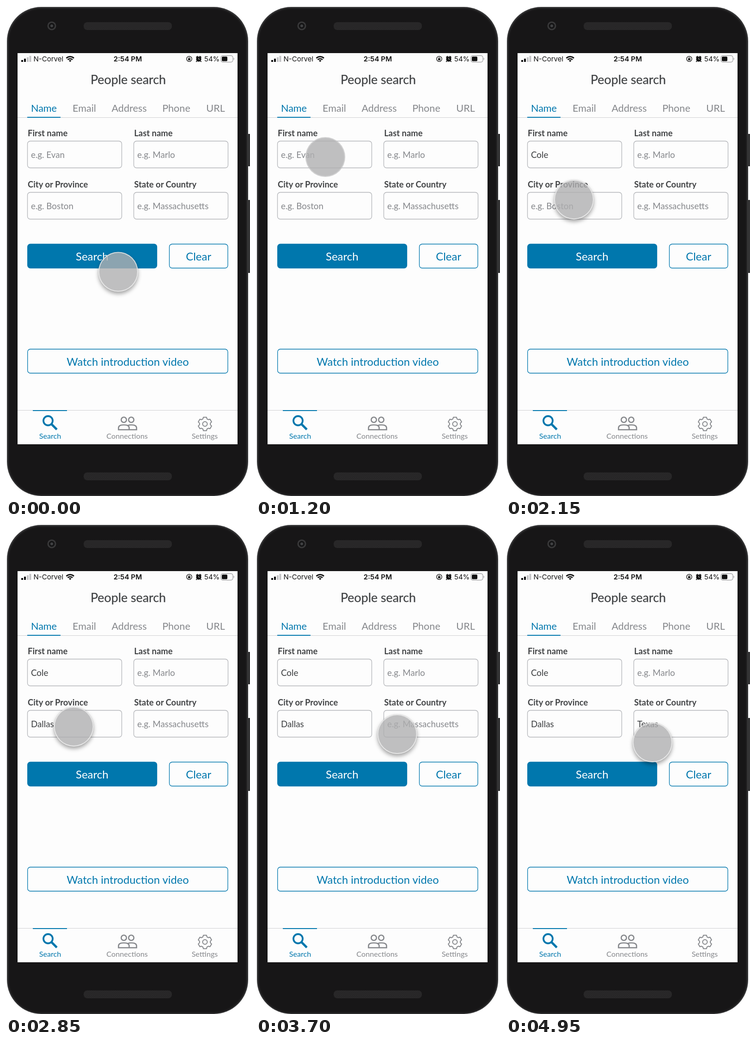
Animation, 528 px wide and 1061 px high, one loop 5 s. Source, as an HTML page:

```html
<!DOCTYPE html>
<html lang="en">
<head>
<meta charset="utf-8">
<title>People search</title>
<style>
html, body { margin: 0; width: 528px; height: 1061px; overflow: hidden; background: #fff; }
svg { display: block; }
text { font-family: Lato, Carlito, sans-serif; fill: #86888c; }
.status text { font: 15px Inter, Roboto, sans-serif; fill: #111; }
.title { font-size: 26.8px; fill: #414345; stroke: #414345; stroke-width: .25; }
.tabs { font-size: 21.6px; }
.labels text { font-size: 18.4px; font-weight: 700; fill: #414345; }
.fields rect { fill: #fdfdfd; stroke: #b3b5b9; stroke-width: 1.3; }
.fields text { font-size: 18.8px; }
.fields .typed { fill: #3c3e40; }
.buttons text { font-size: 24px; text-anchor: middle; }
.buttons rect { fill: #fdfdfd; stroke: #0077ad; stroke-width: 1.3; }
.nav text { font-size: 16.2px; text-anchor: middle; }
.mid { text-anchor: middle; }
.blue, .buttons .blue, .nav .blue { fill: #0077ad; }
.line { fill: none; stroke: #86888c; stroke-width: 2.6; }
.gear .line { stroke-width: 2; stroke-linejoin: round; }
#touch {
  position: absolute; left: -43px; top: -43px; width: 86px; height: 86px;
  box-sizing: border-box; border-radius: 50%;
  background: rgba(176, 176, 177, .8); border: 2px solid;
}
</style>
</head>
<body>
<svg width="528" height="1061" viewBox="0 0 528 1061">
  <defs>
    <pattern id="mesh" width="4" height="4" patternUnits="userSpaceOnUse">
      <rect width="4" height="4" fill="#2b2a2b"/>
      <circle cx="1" cy="1" r=".8" fill="#1c1b1c"/><circle cx="3" cy="3" r=".8" fill="#1c1b1c"/>
    </pattern>
  </defs>

  <!-- phone -->
  <path d="M522 277h6v70h-6zM522 420h6v158h-6z" fill="#343435"/>
  <rect x="2" y="2" width="522" height="1059" rx="74" fill="#323233"/>
  <rect x="5" y="5" width="516" height="1054" rx="71" fill="#1b1a1b"/>
  <rect x="8" y="8" width="510" height="1048" rx="68" fill="#171617"/>
  <circle cx="99" cy="43" r="9.5" fill="#39393a"/>
  <circle cx="99" cy="43" r="6.5" fill="#151516"/>
  <circle cx="99" cy="43" r="3" fill="#414244"/>
  <rect x="168" y="35" width="191" height="17" rx="8" fill="url(#mesh)"/>
  <rect x="168" y="1010" width="191" height="17" rx="8" fill="url(#mesh)"/>
  <rect x="25" y="102" width="476" height="847" fill="#fdfdfd"/>

  <g class="status">
    <path d="M33 117h4v4h-4zM39 114h4v7h-4z" fill="#111"/>
    <path d="M45 111h4v10h-4zM50.500 108h4v13h-4z" fill="#c4c4c6"/>
    <text x="59.500" y="120">N-Corvel</text>
    <g fill="none" stroke="#111" stroke-width="2.7">
      <path d="M130.500 113a12 12 0 0 1 16.500 0M133.500 116.300a7.800 7.800 0 0 1 10.500 0"/>
      <path d="M136 118.300a4 4 0 0 1 5.500 0l-2.750 3z" fill="#111" stroke="none"/>
    </g>
    <text class="mid" x="263.500" y="120" style="font-weight:600;font-size:15.200px">2:54 PM</text>
    <circle cx="396.500" cy="114.500" r="5.700" fill="none" stroke="#111" stroke-width="1.300"/>
    <rect x="394" y="113.500" width="5" height="4" fill="#111"/>
    <path d="M395 114v-1.500a1.500 1.500 0 0 1 3 0v1.500" fill="none" stroke="#111"/>
    <circle cx="417" cy="115" r="5.600" fill="#111"/>
    <path d="M411.500 111.500l3.500-3M422.500 111.500l-3.500-3M413 119l-1.500 2M421 119l1.500 2" stroke="#111" stroke-width="2"/>
    <path d="M417 112v3.200l2.200 1.300" fill="none" stroke="#fff" stroke-width=".8"/>
    <text x="429" y="120">54%</text>
    <rect x="465" y="107.500" width="26" height="14" rx="4" fill="none" stroke="#858587"/>
    <rect x="467" y="109.500" width="12" height="10" rx="2" fill="#111"/>
    <path d="M492.700 112q2.300 2.500 0 5z" fill="#858587"/>
  </g>

  <text class="title mid" x="264.500" y="169">People search</text>

  <g class="tabs">
    <path d="M25 241.500h476" stroke="#cfd0d2"/>
    <path class="blue" d="M46 240h72v2h-72z"/>
    <text class="mid blue" x="82" y="229">Name</text>
    <text class="mid" x="169.500" y="229">Email</text>
    <text class="mid" x="266.500" y="229">Address</text>
    <text class="mid" x="368.500" y="229">Phone</text>
    <text class="mid" x="453.500" y="229">URL</text>
  </g>

  <g class="labels">
    <text x="47" y="281.500">First name</text>
    <text x="277.300" y="281.500">Last name</text>
    <text x="47" y="392.800">City or Province</text>
    <text x="277.300" y="392.800">State or Country</text>
  </g>

  <g class="fields">
    <rect x="46.500" y="292.500" width="204" height="58" rx="6"/>
    <rect x="276.500" y="292.500" width="204" height="58" rx="6"/>
    <rect x="46.500" y="403.500" width="204" height="58" rx="6"/>
    <rect x="276.500" y="403.500" width="204" height="58" rx="6"/>
    <text id="first" x="54" y="328.500"></text>
    <text x="284" y="328.500">e.g. Marlo</text>
    <text id="city" x="54" y="439.500"></text>
    <text id="state" x="284" y="439.500"></text>
  </g>

  <g class="buttons">
    <rect class="blue" x="46.700" y="515.500" width="279.800" height="52" rx="6"/>
    <text x="186.300" y="550.500" style="fill:#fff">Search</text>
    <rect x="353.500" y="515.500" width="126.500" height="52" rx="6"/>
    <text class="blue" x="416.700" y="550.500">Clear</text>
    <rect x="46.700" y="743" width="433.300" height="52" rx="6"/>
    <text class="blue" x="263.500" y="778.500" style="font-size:23.700px">Watch introduction video</text>
  </g>

  <g class="nav">
    <path d="M25 875.500h476" stroke="#cfd0d2"/>
    <path class="blue" d="M58 875h74v2h-74z"/>
    <circle cx="91" cy="898" r="10" fill="none" stroke="#0077ad" stroke-width="3.800"/>
    <path d="M98 905l12 12" stroke="#0077ad" stroke-width="4.800"/>
    <text class="blue" x="95.500" y="937">Search</text>
    <g class="line">
      <circle cx="255" cy="896" r="5.700"/><circle cx="271" cy="896" r="5.700"/>
      <path d="M243.500 917.500v-4q0-6.500 11.500-6.500t11.500 6.500v4zM266.500 917.500h16v-4q0-6.500-11.500-6.500-4.500 0-7 1.200"/>
    </g>
    <text x="262" y="937">Connections</text>
    <g class="gear">
      <path id="gear" class="line"/>
      <circle class="line" cx="430.500" cy="905" r="5"/>
    </g>
    <text x="430" y="937">Settings</text>
  </g>
</svg>
<div id="touch"></div>
<script>
const LOOP = 5000;
const $ = id => document.getElementById(id);

// time, x, y of the touch point
const path = [
  [0, 243, 576], [550, 171, 370], [1100, 150, 327], [1700, 150, 327],
  [2150, 147, 419], [2350, 145, 438], [2800, 145, 438], [3300, 227, 461],
  [3900, 329, 451], [4200, 338, 446], [4350, 338, 446], [4950, 317, 473], [5000, 317, 473]
];
// start and end of each press, when the shadow is gone
const presses = [[1150, 1550], [2420, 2560], [4260, 4320]];
// field, placeholder, typed text, time of change
const entries = [
  ['first', 'e.g. Evan', 'Cole', 1500],
  ['city', 'e.g. Boston', 'Dallas', 2550],
  ['state', 'e.g. Massachusetts', 'Texas', 4250]
];

const gearPoints = [];
for (let i = 0; i < 6; i++) {
  for (const [turn, r] of [[-22, 11.8], [-13, 15], [13, 15], [22, 11.8]]) {
    const a = (i * 60 + turn) * Math.PI / 180;
    gearPoints.push((430.5 + r * Math.sin(a)).toFixed(2) + ' ' + (905 - r * Math.cos(a)).toFixed(2));
  }
}
$('gear').setAttribute('d', 'M' + gearPoints.join('L') + 'z');

const slope = (i, k) => (path[i + 1][k] - path[i][k]) / (path[i + 1][0] - path[i][0]);

// monotone tangents: smooth through moving points, still at rests
function tangent(i, k) {
  if (i === 0) return slope(0, k) * 1.3;
  if (i === path.length - 1) return 0;
  const a = slope(i - 1, k), b = slope(i, k);
  return a * b > 0 ? 2 * a * b / (a + b) : 0;
}

function position(t, k) {
  let i = 0;
  while (i < path.length - 2 && t >= path[i + 1][0]) i++;
  const span = path[i + 1][0] - path[i][0], u = (t - path[i][0]) / span, v = 1 - u;
  return path[i][k] * (1 + 2 * u) * v * v + path[i + 1][k] * (3 - 2 * u) * u * u
    + span * (tangent(i, k) * u * v * v - tangent(i + 1, k) * u * u * v);
}

function lift(t) {
  const gap = Math.min(...presses.map(([a, b]) => Math.max(a - t, t - b, 0)));
  return Math.min(gap / 120, 1);
}

function draw(now) {
  const t = now % LOOP, h = lift(t), style = $('touch').style;
  style.transform = `translate(${position(t, 1)}px, ${position(t, 2)}px)`;
  style.borderColor = `rgba(255,255,255,${.25 + .35 * h})`;
  style.boxShadow =
    `0 0 1px rgba(90,90,90,${.2 + .35 * h}), 0 ${5 * h}px ${8 * h}px rgba(0,0,0,${.34 * h})`;
  for (const [id, hint, value, at] of entries) {
    $(id).textContent = t < at ? hint : value;
    $(id).classList.toggle('typed', t >= at);
  }
  requestAnimationFrame(draw);
}
requestAnimationFrame(draw);
</script>
</body>
</html>
```
